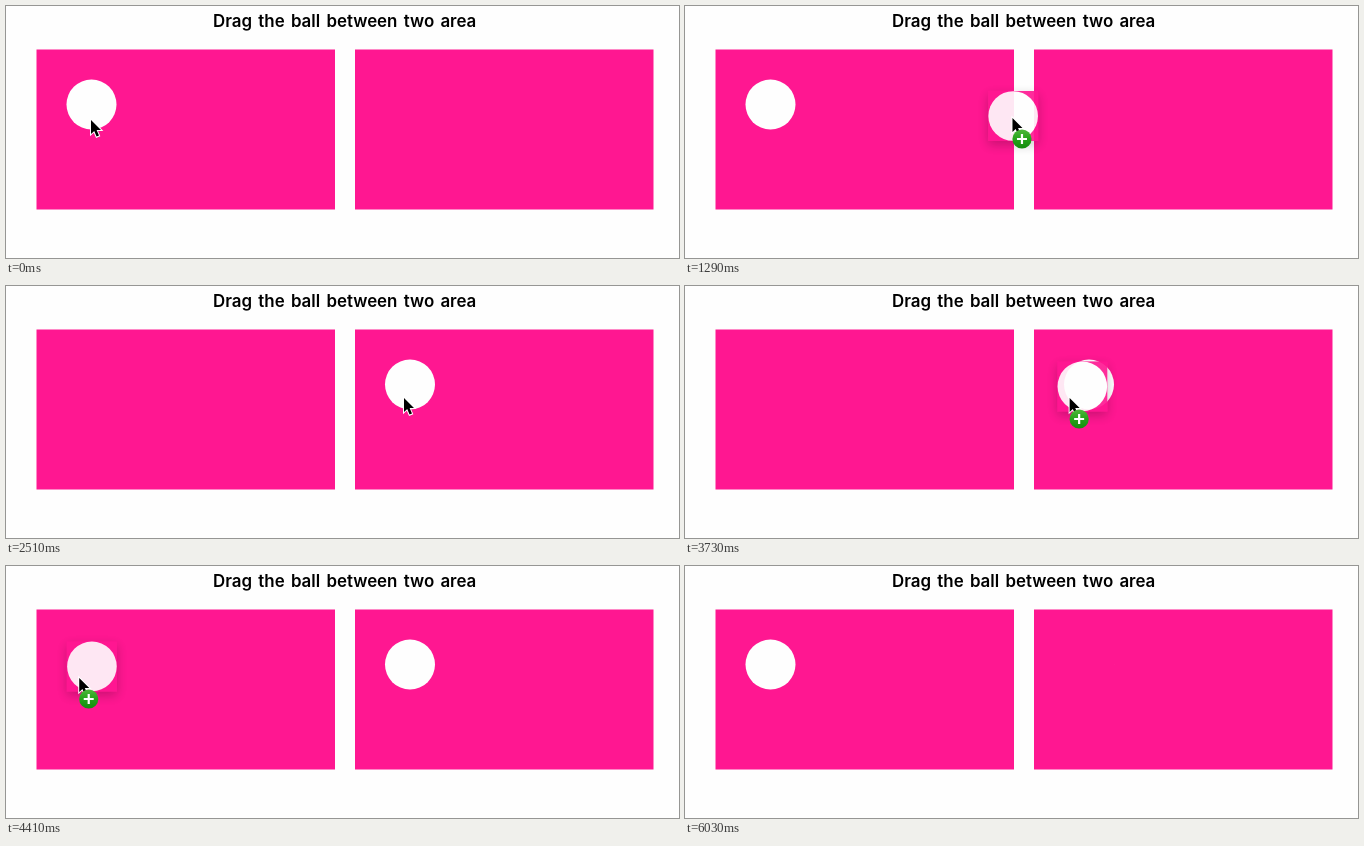
These frames come from a looping animation (673x252 px, 6600 ms). An HTML page:

```html
<!DOCTYPE html>
<html lang="en">
<head>
<meta charset="utf-8">
<title>Drag the ball</title>
<style>
  html, body { margin: 0; width: 100%; height: 100%; overflow: hidden; background: #fefefe; }
  svg { display: block; width: 673px; height: 252px; }
  text { font: 600 16.9px Inter, "Open Sans", sans-serif; word-spacing: 2px; text-anchor: middle; }
  .area { fill: #ff1791; }
  .ball { fill: #fefefe; }
</style>
</head>
<body>
<svg viewBox="0 0 673 252">
  <defs>
    <linearGradient id="green" x1="0" y1="0" x2="0" y2="1">
      <stop offset="0" stop-color="#4fb83c"/>
      <stop offset="0.5" stop-color="#25a31a"/>
      <stop offset="1" stop-color="#158c0f"/>
    </linearGradient>
    <filter id="shadow" x="-60%" y="-60%" width="220%" height="220%">
      <feDropShadow dx="0" dy="4" stdDeviation="5.5" flood-color="#000" flood-opacity="0.24"/>
    </filter>
  </defs>
  <text x="338.7" y="21">Drag the ball between two area</text>
  <rect class="area" x="30.5" y="43.5" width="298.5" height="160"/>
  <rect class="area" x="349" y="43.5" width="298.5" height="160"/>
  <circle class="ball" id="ball" cy="98.5" r="25"/>
  <g id="ghost" opacity="0.9">
    <rect class="area" x="-25" y="-25" width="50" height="50" filter="url(#shadow)"/>
    <circle class="ball" r="24.8"/>
  </g>
  <g id="cursor">
    <path d="M0 0V14L3.2 11L5.6 16.6L8 15.6L5.6 10.1H10Z" stroke="#fff" stroke-width="2" paint-order="stroke"/>
    <g id="badge" transform="translate(9.5 21)">
      <circle r="9.6" fill="url(#green)"/>
      <path d="M-5 0H5M0 -5V5" stroke="#fff" stroke-width="2.2"/>
    </g>
  </g>
</svg>
<script>
const LOOP = 6600, EXIT = 6030;
const LEFT = 85.5, RIGHT = 404;

// pointer strokes; a higher bend makes y arrive before x
const home = { x: 85, y: 114 };
const strokes = [
  { from: 50, to: 270, x: 83, y: 102.5 },
  { from: 430, to: 1780, x: 382, y: 112, bend: 4 },
  { from: 2180, to: 2510, x: 398, y: 112 },
  { from: 3650, to: 4490, x: 71, y: 112 },
  { from: 4590, to: 5080, x: 246, y: 130 },
  { from: 5420, to: 6200, x: 590, y: 264 }
];

// the copy sits at a fixed offset from the pointer
const drags = [
  { from: 450, to: 1850, dx: 0.7, dy: -2 },
  { from: 3670, to: 4580, dx: 12.7, dy: -11.6 }
];

const el = id => document.getElementById(id);
const ball = el("ball"), ghost = el("ghost"), cursor = el("cursor"), badge = el("badge");

const mix = (a, b, p) => a + (b - a) * p;

// smooth start and stop, peaking a little before the middle
function ease(u) {
  const v = 1 - (1 - u) ** 1.28;
  return v * v * (3 - 2 * v);
}

function pointer(t) {
  let { x, y } = home;
  for (const s of strokes) {
    if (t < s.from) break;
    const p = ease(Math.min(1, (t - s.from) / (s.to - s.from)));
    x = mix(x, s.x, p);
    y = mix(y, s.y, 1 - (1 - p) ** (s.bend || 1));
  }
  return { x, y };
}

function place(node, x, y) {
  node.setAttribute("transform", `translate(${x.toFixed(2)} ${y.toFixed(2)})`);
}

function show(node, on) {
  node.setAttribute("display", on ? "inline" : "none");
}

function draw(t) {
  const { x, y } = pointer(t);
  const drag = drags.find(d => t >= d.from && t < d.to);
  const onRight = t >= drags[0].to && t < drags[1].to;
  ball.setAttribute("cx", onRight ? RIGHT : LEFT);
  place(cursor, x, y);
  show(cursor, t < EXIT);
  show(ghost, drag);
  show(badge, drag);
  if (drag) place(ghost, x + drag.dx, y + drag.dy);
}

const start = performance.now();
function tick() {
  draw((performance.now() - start) % LOOP);
  requestAnimationFrame(tick);
}
tick();
</script>
</body>
</html>
```
